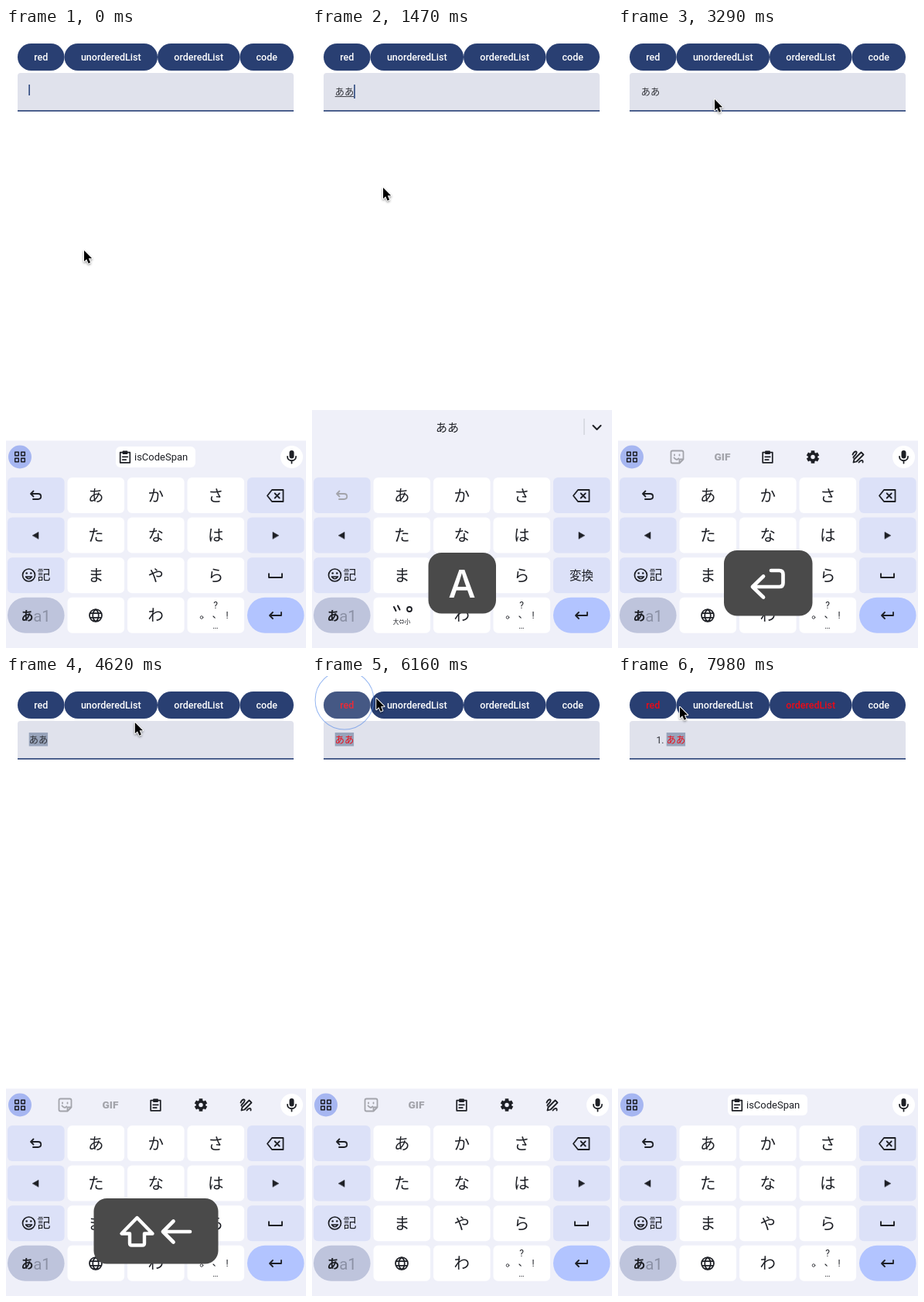
An HTML page with a canvas that plays this animation: 388x800 px, repeating every 8000 ms.

```html
<!DOCTYPE html>
<html lang="ja">
<head>
<meta charset="utf-8">
<style>
html, body { margin: 0; width: 100%; height: 100%; overflow: hidden; background: #fff; }
canvas { display: block; width: 388px; height: 800px; }
</style>
</head>
<body>
<canvas id="stage"></canvas>
<script>
const W = 388, H = 800, LOOP = 8000;
const cv = document.getElementById('stage');
const g = cv.getContext('2d');
const dpr = window.devicePixelRatio || 1;
cv.width = W * dpr;
cv.height = H * dpr;

const INK = '#1d1f25', NAVY = '#293f72', RED = '#ec0a17', GREY = '#a3a4ab';
const PANEL = '#eff0f9', SIDE = '#dce1f8';
const JP = '"Noto Sans CJK JP", "Noto Sans CJK", sans-serif';
const UI = 'Roboto, sans-serif';

// Times of the events, in ms
const FIRST = 1050, SECOND = 1400, COMMIT = 2660, SHIFT = 3570;
const SEL1 = 3710, SEL2 = 4060, CLICK1 = 5880, CLICK2 = 7070;

const path = [
  [0, 101, 287], [70, 101, 287], [350, 92, 206], [1890, 92, 206],
  [2380, 125, 92], [3570, 125, 92], [4270, 165, 62], [4620, 167, 60],
  [5250, 58, 34], [5530, 42, 31], [5950, 42, 31], [6160, 83, 29],
  [6860, 257, 25], [7490, 257, 25], [7980, 80, 40], [8000, 80, 40]
];

const buttons = [['red', 15, 75.5], ['unorderedList', 75.5, 196],
  ['orderedList', 196, 302.5], ['code', 302.5, 372]];

const clamp = v => Math.max(0, Math.min(1, v));

function text(s, x, y, font, color, align = 'center') {
  g.font = font;
  g.fillStyle = color;
  g.textAlign = align;
  g.fillText(s, x, y);
}

// Japanese glyphs centred on a point
const kana = (s, x, y, size, color = INK, weight = 400) =>
  text(s, x, y + size * .38, `${weight} ${size}px ${JP}`, color);

function box(x, y, w, h, r, color) {
  g.beginPath();
  g.roundRect(x, y, w, h, r);
  g.fillStyle = color;
  g.fill();
}

function disc(x, y, r, color) {
  g.beginPath();
  g.arc(x, y, r, 0, 7);
  g.fillStyle = color;
  g.fill();
}

// SVG path drawn around (x, y)
function icon(x, y, d, color = INK, width = 1.8, fill = false) {
  g.save();
  g.translate(x, y);
  const p = new Path2D(d);
  g.lineWidth = width;
  g.lineCap = g.lineJoin = 'round';
  g.strokeStyle = g.fillStyle = color;
  if (fill) g.fill(p);
  if (width) g.stroke(p);
  g.restore();
}

function mouseAt(t) {
  let i = 1;
  while (i < path.length - 1 && t > path[i][0]) i++;
  const [t0, x0, y0] = path[i - 1], [t1, x1, y1] = path[i];
  const k = clamp((t - t0) / (t1 - t0));
  return [x0 + (x1 - x0) * k, y0 + (y1 - y0) * k];
}

function drawRipple(dt, x, y, a, b) {
  if (dt < 0 || dt > 520) return;
  const k = clamp(dt / 280), fade = 1 - clamp((dt - 300) / 220);
  g.save();
  g.beginPath();
  g.roundRect(a, 20, b - a, 35, 17.5);
  g.clip();
  disc(x, y, 4 + k * k * (b - a) * .95, `rgba(255,255,255,${.13 * fade})`);
  g.restore();
}

function drawButtons(t) {
  buttons.forEach(([label, a, b], i) => {
    const on = i === 0 && t >= CLICK1 + 70 || i === 2 && t >= CLICK2 + 70;
    box(a, 20, b - a, 35, 17.5, NAVY);
    text(label, (a + b) / 2, 42, `500 12.5px ${UI}`, on ? RED : '#fff');
    if (i === 0) drawRipple(t - CLICK1, 42, 31, a, b);
    if (i === 2) drawRipple(t - CLICK2, 257, 27, a, b);
  });
}

function drawField(t) {
  box(15, 58, 357, 49.5, [4, 4, 0, 0], '#e0e2ec');
  g.fillStyle = '#344b7e';
  g.fillRect(15, 106, 357, 1.7);
  const count = t < FIRST + 70 ? 0 : t < SECOND ? 1 : 2;
  const list = t >= CLICK2 + 70;
  const x = list ? 62.7 : 29.7;
  const end = x + count * 12.2;
  if (t >= SEL1) {
    const from = t < SEL2 ? end - 12.2 : x;
    g.fillStyle = '#98a4bb';
    g.fillRect(from, 73, end - from, 17.5);
  }
  if (list) text('1.', 49.5, 87, `12.2px ${UI}`, '#303238', 'left');
  for (let i = 0; i < count; i++) {
    kana('あ', x + 6.1 + i * 12.2, 82.3, 12.2, t >= CLICK1 + 70 ? RED : '#303238');
  }
  if (count && t < COMMIT) {
    g.fillStyle = '#303238';
    g.fillRect(x, 88, end - x, .9);
  }
  const caret = t < 350 || t >= 770 && t < 3220 || t >= SHIFT && t < SEL1;
  if (caret) {
    g.fillStyle = '#365084';
    if (count) g.fillRect(end, 73, 1.7, 18);
    else g.fillRect(29.3, 73, 1.7, 14);
  }
}

function drawClipboard(x, y) {
  icon(x, y, 'M-6.3 -5.8H6.3V7.3H-6.3ZM-3.3 -.2H3.3M-3.3 3.6H1.3', INK, 1.7);
  icon(x, y, 'M-2.6 -7.2H2.6V-4.2H-2.6Z', INK, 1.5, true);
}

function drawToolbar(t) {
  disc(18, 553.5, 15, '#a6b6f1');
  for (const dx of [-4, 4]) for (const dy of [-4, 4]) {
    icon(18 + dx, 553.5 + dy, 'M-2.3 -2.3H2.3V2.3H-2.3Z', INK, 1.5);
  }
  disc(369.5, 553.5, 14.5, '#fff');
  box(366.5, 545, 6, 10.5, 3, INK);
  icon(369.5, 553.5, 'M-5.5 -.5C-5.5 6.5 5.5 6.5 5.5 -.5M0 5V8', INK, 1.8);

  if (t < COMMIT + 70 || t >= CLICK2 + 70) {
    box(142, 540, 103, 27, 6, '#fff');
    drawClipboard(154, 553.5);
    text('isCodeSpan', 166, 558, `13px ${UI}`, INK, 'left');
    return;
  }
  icon(76.5, 553.5, 'M3 8H-6Q-8 8 -8 6V-6Q-8 -8 -6 -8H6Q8 -8 8 -6V3L3 8V4Q3 3 4 3H8M-4 1Q-1 5 2 2M-3.5 -3V-2M3 -3V-2', GREY, 1.8);
  text('GIF', 135, 558.2, `900 13.6px ${UI}`, GREY);
  drawClipboard(193.5, 553.5);
  g.save();
  g.translate(252, 553.5);
  g.fillStyle = INK;
  for (let i = 0; i < 6; i++) {
    g.rotate(Math.PI / 3);
    g.fillRect(-2.3, -8.2, 4.6, 5);
  }
  disc(0, 0, 6.2, INK);
  disc(0, 0, 2.7, PANEL);
  g.restore();
  icon(310.5, 553.5, 'M-6 7L-5 3L4 -6L7 -3L-2 6ZM-7 -3C-5 -8 -1 -8 -2 -5S-7 0 -6 1M1 7C3 4 7 3 6 7', INK, 1.8);
}

function drawCandidates(t) {
  kana(t < SECOND ? 'あ' : 'ああ', 175, 515, 15);
  g.fillStyle = '#c3c5ce';
  g.fillRect(351.5, 504, 1, 21);
  icon(368.5, 515.5, 'M-5 -2.5L0 2.5L5 -2.5', INK, 2);
}

const LETTERS = ['あかさ', 'たなは', 'まやら', ' わ '];

function drawKeys(typing) {
  for (let r = 0; r < 4; r++) for (let c = 0; c < 5; c++) {
    const x = 2 + c * 77.5, y = 580 + r * 51.6, edge = c === 0 || c === 4;
    const pill = edge && r === 3;
    box(x, y, 73.6, 46, pill ? 23 : 6,
      !edge ? '#fff' : !pill ? SIDE : c ? '#b2c4ff' : '#bec4dc');
    if (!edge) kana(LETTERS[r][c - 1], x + 36.8, y + 22.8, 20.5);
  }
  icon(38.5, 603, 'M-3 -5.5L-6.5 -2L-3 1.5M-6 -2H3C8 -2 8 5 3 5H-3.5', typing ? GREY : INK);
  icon(348.5, 603.5, 'M-4.5 -7.5H10V7.5H-4.5L-10.5 0ZM-.8 -3L5.2 3M5.2 -3L-.8 3', INK, 1.8);
  icon(38.5, 654.7, 'M-4 0L3.5 -4.3V4.3Z', INK, .6, true);
  icon(348.5, 654.7, 'M4 0L-3.5 -4.3V4.3Z', INK, .6, true);
  icon(29.5, 706, 'M8 0A8 8 0 1 1 -8 0A8 8 0 1 1 8 0ZM-4 2Q0 7.5 4 2Z', INK, 1.7);
  disc(26.7, 703.5, 1.3, INK);
  disc(32.3, 703.5, 1.3, INK);
  kana('記', 49, 706, 17);
  if (typing) kana('変換', 348.5, 706, 15.5);
  else icon(348.5, 706.5, 'M-8.5 -2.2V2.5H8.5V-2.2', INK, 1.9);

  kana('あ', 27.5, 758, 16, INK, 700);
  text('a1', 46.5, 765.5, `400 20.5px ${UI}`, '#8b91a5');
  if (typing) {
    icon(111, 750, 'M-5 -3L-2.5 2M0 -4.5L2.5 .5', INK, 2);
    icon(126, 750, 'M3 0A3 3 0 1 1 -3 0A3 3 0 1 1 3 0Z', INK, 1.8);
    kana('大⇔小', 116, 766.5, 7.5);
  } else {
    icon(116, 758, 'M8 0A8 8 0 1 1 -8 0A8 8 0 1 1 8 0ZM0 -8C-5 -4 -5 4 0 8C5 4 5 -4 0 -8ZM-7.4 -2.8H7.4M-7.4 2.8H7.4', INK, 1.7);
  }
  text('?', 271, 748.5, `12px ${UI}`, INK);
  text('!', 286, 762, `12px ${UI}`, INK);
  text('…', 271, 775, `11px ${UI}`, INK);
  icon(253, 760.5, 'M1.8 0A1.8 1.8 0 1 1 -1.8 0A1.8 1.8 0 1 1 1.8 0Z', INK, .8);
  icon(269, 760, 'M-1 -1L1.2 1.2', INK, 1.1);
  icon(348.5, 758, 'M-3.5 -4L-7.5 0L-3.5 4M-7 0H7.5V-4', INK, 1.8);
}

function drawKeyboard(t) {
  const typing = t >= FIRST + 70 && t < COMMIT + 70;
  const top = typing ? 493 : 532.5;
  g.fillStyle = PANEL;
  g.fillRect(0, top, W, H - top);
  if (typing) drawCandidates(t);
  else drawToolbar(t);
  drawKeys(typing);
}

const shiftMark = x => icon(x, 717, 'M0 -18L-20 2.5H-9.5V15Q-9.5 17.5 -7 17.5H7Q9.5 17.5 9.5 15V2.5H20Z', '#fff', 4.4);

function drawPopup(t) {
  const card = (x, y, w, h) => box(x, y, w, h, 17, '#4a4a4a');
  g.save();
  if (t >= FIRST && t < 2380) {
    g.globalAlpha = 1 - clamp((t - 2100) / 280);
    card(150.5, 677, 87.5, 78.5);
    text('A', 194, 735, '500 50px Inter, sans-serif', '#fff');
  } else if (t >= COMMIT && t < SHIFT) {
    card(137, 674, 114.5, 84.5);
    icon(194, 717, 'M4 -17H14.5Q19.5 -17 19.5 -12V-1Q19.5 4 14.5 4H-19M-6 -9.5L-20 4L-6 17.5', '#fff', 4.7);
  } else if (t >= SHIFT && t < SEL1) {
    card(144, 674, 100, 84.5);
    shiftMark(194);
  } else if (t >= SEL1 && t < 5530) {
    g.globalAlpha = 1 - clamp((t - 5250) / 280);
    card(113.5, 674, 161, 84.5);
    shiftMark(169.5);
    icon(220, 717, 'M-17 0H18M-3.5 -13.5L-17 0L-3.5 13.5', '#fff', 4.7);
  }
  g.restore();
}

function drawRing(t, start, x, y) {
  const dt = t - start;
  if (dt < 0 || dt > 330) return;
  const k = dt / 300;
  g.beginPath();
  g.arc(x, y, 18.5 + 20.7 * k, 0, 7);
  g.fillStyle = `rgba(120,160,235,${Math.max(0, .16 - .18 * k)})`;
  g.fill();
  g.lineWidth = Math.max(.5, 5.5 - 4.8 * k);
  g.strokeStyle = `rgba(78,134,232,${clamp(1.08 - .52 * k)})`;
  g.stroke();
}

function drawMouse(t) {
  const [x, y] = mouseAt(t);
  const arrow = 'M0 0V14.2L3.2 11.2L5.6 16.7L8.1 15.6L5.8 10.2H10.2Z';
  g.save();
  g.shadowColor = 'rgba(0,0,0,.3)';
  g.shadowBlur = 3 * dpr;
  g.shadowOffsetY = 1.5 * dpr;
  icon(x, y, arrow, '#fff', 2, true);
  g.restore();
  icon(x, y, arrow, '#000', 0, true);
}

function frame(now) {
  const t = now % LOOP;
  g.setTransform(dpr, 0, 0, dpr, 0, 0);
  g.fillStyle = '#fff';
  g.fillRect(0, 0, W, H);
  drawButtons(t);
  drawField(t);
  drawKeyboard(t);
  drawPopup(t);
  drawRing(t, CLICK1, 42, 31);
  drawRing(t, CLICK2, 257.5, 28);
  drawMouse(t);
}

const begin = performance.now();
function tick() {
  frame(performance.now() - begin);
  requestAnimationFrame(tick);
}
tick();
</script>
</body>
</html>
```
